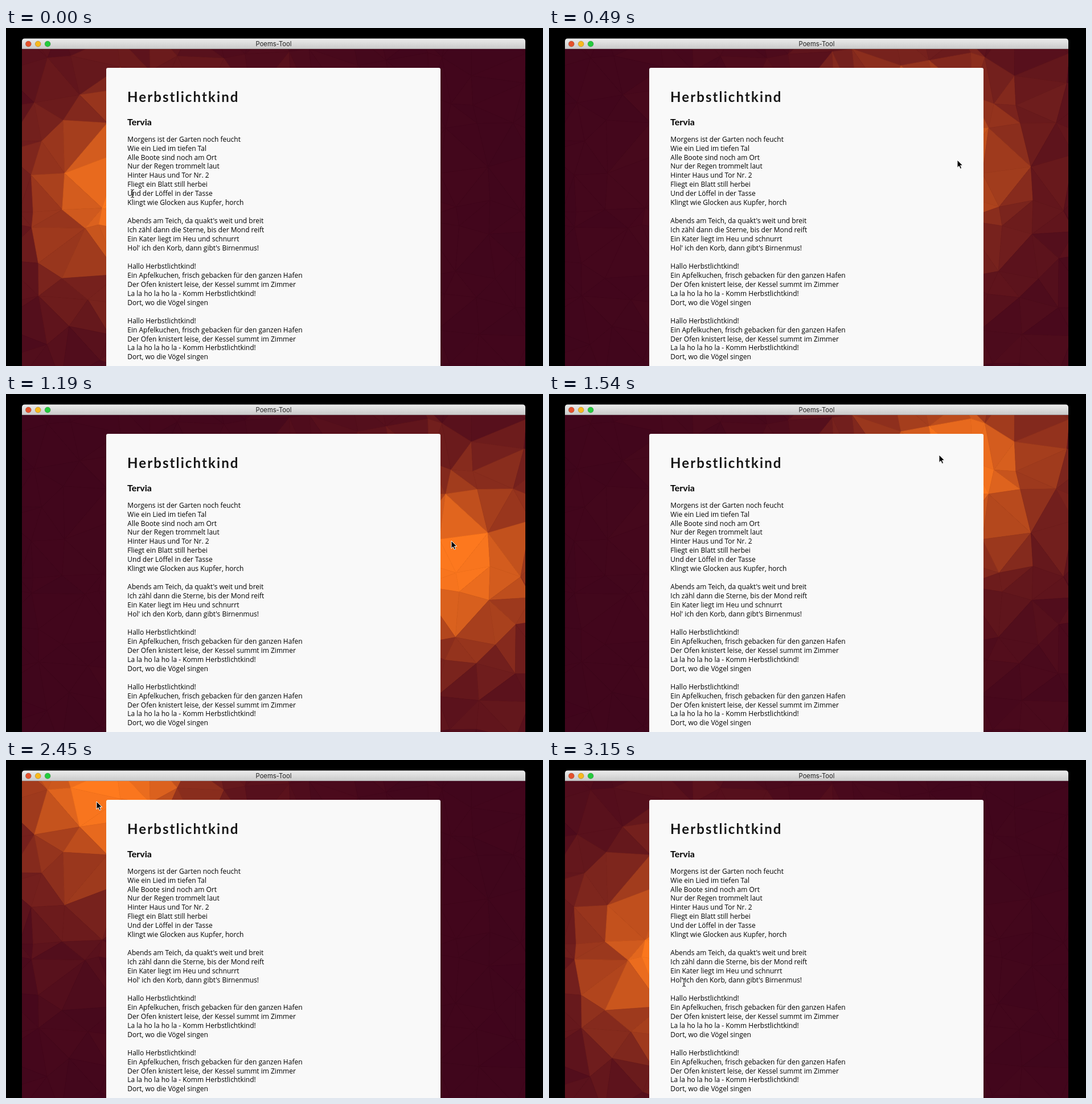
An HTML page that plays this animation: 943 px wide and 594 px high, repeating every 3.22 s.

```html
<!DOCTYPE html>
<html lang="de">
<head>
<meta charset="utf-8">
<title>Poems-Tool</title>
<style>
html, body { margin: 0; width: 100%; height: 100%; overflow: hidden; background: #000; }
svg { display: block; }
text { white-space: pre; }
.bar { font: 11.2px Inter, "Liberation Sans", sans-serif; fill: #222; text-anchor: middle; }
.title { font: bold 24px Lato, sans-serif; letter-spacing: 2.1px; fill: #161616; }
.artist { font: bold 16px Lato, sans-serif; }
.verse { font: 12px "Open Sans", sans-serif; }
</style>
</head>
<body>
<svg width="943" height="594" viewBox="0 0 943 594">
  <defs>
    <linearGradient id="metal" x2="0" y2="1">
      <stop stop-color="#ececec"/><stop offset="1" stop-color="#c9c9c9"/>
    </linearGradient>
    <clipPath id="pane"><rect x="28" y="37" width="884" height="557"/></clipPath>
  </defs>
  <rect width="943" height="594"/>
  <g clip-path="url(#pane)"><g id="mesh" stroke-width=".7"></g></g>
  <path d="M28 37V23.5q0-5 5-5H907q5 0 5 5V37z" fill="url(#metal)"/>
  <path d="M28 36.5H912" stroke="#a5a0a2"/>
  <g id="lights" stroke="#000" stroke-opacity=".25" stroke-width=".8"></g>
  <text class="bar" x="470" y="32">Poems-Tool</text>
  <rect x="176" y="70" width="587" height="540" rx="3" fill="#f9f9f9"/>
  <text class="title" x="213" y="129.5">Herbstlichtkind</text>
  <text class="artist" x="213" y="171">Tervia</text>
  <g id="verses"></g>
  <path id="arrow" d="M0 0V13.5L3.1 10.6 5.2 15.4 7.6 14.4 5.5 9.7H9.7Z" stroke="#fff"/>
  <path id="beam" d="M-3-7Q0-7 0-4.500Q0-7 3-7M0-4.500V4.500M-3 7Q0 7 0 4.500Q0 7 3 7M-1.500 2.500H1.500" fill="none" stroke="#222" stroke-width="1.1"/>
</svg>
<script>
const LOOP = 3220, STEP = 70;
const LIGHT_LAG = 80;   // the glow trails the pointer
const CELL = 60;        // mean spacing of mesh corners
const byId = id => document.getElementById(id);

function add(parent, tag, attrs) {
  const node = document.createElementNS('http://www.w3.org/2000/svg', tag);
  for (const key in attrs) node.setAttribute(key, attrs[key]);
  return parent.appendChild(node);
}

['#e5512c', '#f8b91e', '#25cb3d'].forEach((fill, i) =>
  add(byId('lights'), 'circle', { cx: 39.3 + i * 16.9, cy: 28, r: 5, fill }));

const chorus = `Hallo Herbstlichtkind!
Ein Apfelkuchen, frisch gebacken für den ganzen Hafen
Der Ofen knistert leise, der Kessel summt im Zimmer
La la ho la ho la - Komm Herbstlichtkind!
Dort, wo die Vögel singen`;

const verses = `Morgens ist der Garten noch feucht
Wie ein Lied im tiefen Tal
Alle Boote sind noch am Ort
Nur der Regen trommelt laut
Hinter Haus und Tor Nr. 2
Fliegt ein Blatt still herbei
Und der Löffel in der Tasse
Klingt wie Glocken aus Kupfer, horch

Abends am Teich, da quakt's weit und breit
Ich zähl dann die Sterne, bis der Mond reift
Ein Kater liegt im Heu und schnurrt
Hol' ich den Korb, dann gibt's Birnenmus!

${chorus}

${chorus}`;

verses.split('\n').forEach((line, i) => {
  add(byId('verses'), 'text', { class: 'verse', x: 213.3, y: 199.6 + i * 15.95 }).textContent = line;
});

function noise(n) {
  const v = Math.sin(n * 12.9898) * 43758.5453;
  return v - Math.floor(v);
}

// Corner of a grid, shifted at random
function corner(col, row) {
  const seed = col * 31 + row * 7;
  const shift = n => 0.8 * (noise(n) - 0.5);
  return [(col + shift(seed + 1)) * CELL, (row + shift(seed + 500)) * CELL];
}

const span = (a, b) => Math.hypot(a[0] - b[0], a[1] - b[1]);
const facets = [];

function addFacet(...corners) {
  facets.push({
    center: [0, 1].map(axis => corners.reduce((sum, p) => sum + p[axis], 0) / 3),
    shade: 0.86 + 0.28 * noise(facets.length + 1),
    node: add(byId('mesh'), 'polygon', { points: corners.join(' ') })
  });
}

// Each cell is split along its shorter diagonal
for (let col = -1; col < 17; col++) {
  for (let row = -1; row < 11; row++) {
    const a = corner(col, row), b = corner(col + 1, row);
    const c = corner(col + 1, row + 1), d = corner(col, row + 1);
    if (span(a, c) < span(b, d)) {
      addFacet(a, b, c);
      addFacet(a, c, d);
    } else {
      addFacet(a, b, d);
      addFacet(b, c, d);
    }
  }
}

// Orange near the light, falling off to dark purple
function glow(distance) {
  const k = 1 / (1 + (distance / 140) ** 2.6);
  return `rgb(${[62 + 193 * k, 5 + 117 * k ** 1.15, 28 + 2 * k].map(Math.round)})`;
}

// Pointer path: time, x, y
const path = [
  [0, 222, 291], [490, 717, 232], [840, 775, 400], [1190, 782, 258],
  [1540, 685, 107], [1890, 433, 50], [2450, 159, 73], [3150, 237, 391]
];

function slope(i, axis) {
  const a = path[Math.max(0, i - 1)], b = path[Math.min(path.length - 1, i + 1)];
  return (b[axis] - a[axis]) / (b[0] - a[0]);
}

function pointerAt(t) {
  const next = Math.max(1, path.findIndex(key => key[0] >= t)), i = next - 1;
  const time = path[next][0] - path[i][0], u = (t - path[i][0]) / time, v = 1 - u;
  return [1, 2].map(axis =>
    path[i][axis] * (1 + 2 * u) * v * v + slope(i, axis) * time * u * v * v +
    path[next][axis] * u * u * (3 - 2 * u) - slope(next, axis) * time * u * u * v);
}

function draw(now) {
  const t = Math.floor((now % LOOP) / STEP) * STEP;
  const [x, y] = pointerAt(t), light = pointerAt(Math.max(0, t - LIGHT_LAG));
  for (const { center, shade, node } of facets) {
    const color = glow(span(center, light) * shade);
    node.setAttribute('fill', color);
    node.setAttribute('stroke', color);
  }
  const overText = x > 213 && x < 420 && y > 188;
  for (const [id, shown] of [['arrow', !overText], ['beam', overText]]) {
    byId(id).setAttribute('transform', `translate(${x} ${y})`);
    byId(id).setAttribute('visibility', shown ? 'visible' : 'hidden');
  }
}

const start = performance.now();
function tick() {
  draw(performance.now() - start);
  requestAnimationFrame(tick);
}
tick();
</script>
</body>
</html>
```
